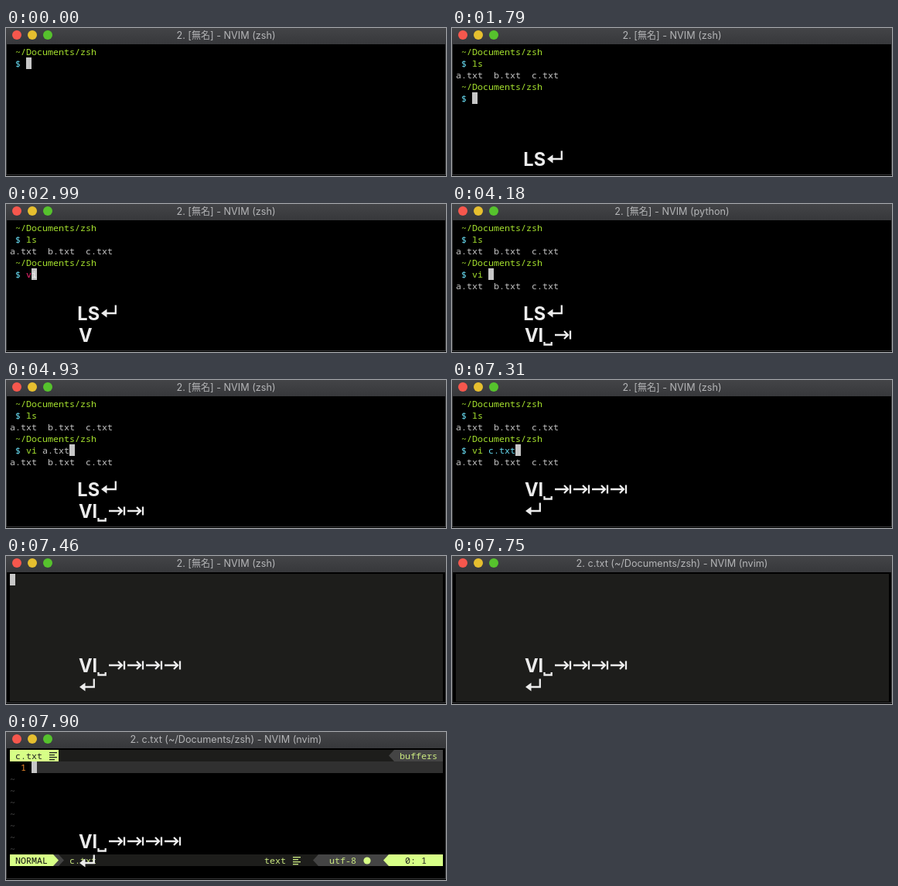
Animation, 569 px wide and 191 px high, one loop 8000 ms. Source, as an HTML page:

```html
<!DOCTYPE html>
<html lang="en">
<head>
<meta charset="utf-8">
<title>Terminal completion</title>
<style>
html, body { margin: 0; width: 100%; height: 100%; overflow: hidden; background: #000; }
svg { display: block; width: 569px; height: 191px; }
.mono { font: 11.667px "Noto Sans Mono", "DejaVu Sans Mono", monospace; white-space: pre; }
.title { font: 12.65px Inter, "Noto Sans CJK JP", sans-serif; fill: #b4b5b7; text-anchor: middle; }
.title .cjk { font: 12px "Noto Sans CJK JP", "Noto Sans CJK", sans-serif; }
.keys { font: 700 23.6px Inter, sans-serif; fill: #ececec; }
.keys .line { fill: none; stroke: #ececec; stroke-width: 2.3; }
</style>
</head>
<body>
<svg id="stage" viewBox="0 0 569 191" xmlns="http://www.w3.org/2000/svg"></svg>
<script>
const LOOP = 8000, CELL = 7, ROW = 15;
const GREEN = '#a6e22e', CYAN = '#66d9ef', RED = '#f92672', PLAIN = '#c4c4c4';
const LIME = '#d7ff87', GREY = '#444', DARK = '#1d1d1b', SOFT = '#cbea80', CURSOR = '#c7c7c7';
const TABS = [4180, 4930, 5670, 6270];

const colX = col => 5 + col * CELL;
const rowY = row => 23 + row * ROW;

// Content visible only between two times
const during = (from, to, ...parts) =>
  `<g data-from="${from}" data-to="${to}">${parts.join('')}</g>`;
const rect = (x, y, w, h, fill) =>
  `<rect x="${x}" y="${y}" width="${w}" height="${h}" fill="${fill}"/>`;
const text = (col, row, str, fill, extra = '') =>
  `<text class="mono" x="${colX(col)}" y="${rowY(row) + 12}" fill="${fill}" ${extra}>${str}</text>`;
const cells = (col, row, count, fill) => rect(colX(col), rowY(row), count * CELL, ROW, fill);
const cursor = (col, row) => cells(col, row, 1, CURSOR);
const wedge = (col, row, fill, left) => {
  const x = colX(col), y = rowY(row);
  const [base, tip] = left ? [x + CELL, x] : [x, x + CELL];
  return `<path d="M${base} ${y}L${tip} ${y + ROW / 2}L${base} ${y + ROW}Z" fill="${fill}"/>`;
};
const linesIcon = (x, row, fill) =>
  [10, 7, 10, 7].map((w, i) => rect(x, rowY(row) + 3 + i * 3, w, 1.3, fill)).join('');
const prompt = row => text(1, row, '~/Documents/zsh', GREEN) + text(1, row + 1, '$', CYAN);
const fileList = row => text(0, row, 'a.txt  b.txt  c.txt', PLAIN);

const title = str => `<text class="title" x="284.5" y="14">${str}</text>`;
const unnamed = job => title(`2. [<tspan class="cjk">無名</tspan>] - NVIM (${job})`);

// Keystroke overlay pieces, placed by left edge and baseline
const label = (str, x, y) => `<text x="${x}" y="${y}">${str}</text>`;
const glyph = (line, x, y, solid = '') =>
  `<g transform="translate(${x} ${y})"><path class="line" d="${line}"/><path d="${solid}"/></g>`;
const enterKey = (x, y) => glyph('M18.8-19.5V-9H5', x, y, 'M0-9L7.5-14.5V-3.5Z');
const spaceKey = y => glyph('M1.5 0V3.5H10.7V0', 118, y);
const tabKey = (i, y) => glyph('M0-9H16.5M12-14L17-9L12-4M20-14.5V-3.5', 133 + i * 24, y);

function windowFrame() {
  const lights = ['#f6574d', '#e6bf2f', '#56c22d'];
  return `<defs><linearGradient id="bar" x2="0" y2="1">
      <stop stop-color="#434447"/><stop offset="1" stop-color="#37383b"/>
    </linearGradient></defs>` +
    rect(0, 0, 569, 191, '#000') +
    '<rect x=".5" y=".5" width="568" height="189" fill="none" stroke="#3b3c3e"/>' +
    rect(0, 0, 569, 21, 'url(#bar)') +
    lights.map((c, i) => `<circle cx="${14 + i * 20}" cy="9" r="6" fill="${c}"/>`).join('');
}

function titles() {
  return [[0, 4180, 'zsh'], [4180, 4930, 'python'], [4930, 5070, 'zsh'],
    [5070, 5670, 'python'], [5670, 7600, 'zsh'], [7600, 7750, 'nvim']]
    .map(([from, to, job]) => during(from, to, unnamed(job))).join('') +
    during(7750, LOOP, title('2. c.txt (~/Documents/zsh) - NVIM (nvim)'));
}

function shell() {
  const argument = (from, to, name, fill) =>
    during(from, to, text(6, 4, name, fill), cursor(11, 4));
  return during(0, 7460, prompt(0)) +
    during(0, 1050, cursor(3, 1)) +
    during(1050, 7460, text(3, 1, 'ls', GREEN)) +
    during(1050, 1650, cursor(5, 1)) +
    during(1650, 7460, fileList(2)) +
    during(1650, 1790, cursor(0, 3)) +
    during(1790, 7460, prompt(3)) +
    during(1790, 2990, cursor(3, 4)) +
    during(2990, 3290, text(3, 4, 'v', RED), cursor(4, 4), text(4, 4, 'i', '#f2f2f2')) +
    during(3290, 7460, text(3, 4, 'vi', GREEN)) +
    during(3290, 3590, cursor(5, 4)) +
    during(3590, 4930, cursor(6, 4)) +
    during(4180, 7460, fileList(5)) +
    argument(4930, 5670, 'a.txt', PLAIN) +
    argument(5670, 6270, 'b.txt', CYAN) +
    argument(6270, 7460, 'c.txt', CYAN);
}

function editor() {
  const tildes = Array.from({ length: 7 }, (_, i) => text(0, i + 2, '~', '#4a4a4a'));
  const bold = 'font-weight="700"';
  return during(7460, 7900, rect(5, 23, 560, 165, DARK)) +
    during(7460, 7600, cursor(0, 0)) +
    during(7900, LOOP,
      cells(0, 0, 80, DARK), cells(0, 0, 9, LIME),
      text(1, 0, 'c.txt', '#222'), linesIcon(56, 0, '#222'),
      wedge(70, 0, GREY, true), cells(71, 0, 9, GREY), text(72, 0, 'buffers', SOFT),
      cells(4, 1, 76, '#303030'), text(2, 1, '1', '#ef8a2c'), cursor(4, 1),
      ...tildes,
      cells(0, 9, 80, DARK), cells(8, 9, 1, GREY),
      cells(0, 9, 8, LIME), wedge(8, 9, LIME), wedge(9, 9, GREY),
      text(1, 9, 'NORMAL', '#111', bold), text(11, 9, 'c.txt', SOFT),
      text(47, 9, 'text', SOFT), linesIcon(371, 9, SOFT),
      wedge(56, 9, GREY, true), cells(57, 9, 13, GREY), text(59, 9, 'utf-8', SOFT),
      `<circle cx="467" cy="166" r="4.6" fill="${LIME}"/>`,
      wedge(69, 9, LIME, true), cells(70, 9, 10, LIME), text(73, 9, '0: 1', '#222'));
}

function keystrokes() {
  const top = 150, bottom = 178;
  const upper = (from, ...parts) => during(from, 7310, ...parts);
  return '<g class="keys">' +
    during(1050, 2990, label('LS', 92.3, bottom)) +
    during(1650, 2990, enterKey(123, bottom)) +
    upper(2990, label('LS', 92.3, top), enterKey(123, top)) +
    during(2990, 3290, label('V', 94, bottom)) +
    upper(3290, label('VI', 94, bottom)) +
    upper(3440, spaceKey(bottom)) +
    TABS.map((time, i) => upper(time, tabKey(i, bottom))).join('') +
    during(7310, LOOP, label('VI', 94, top), spaceKey(top),
      ...TABS.map((_, i) => tabKey(i, top)), enterKey(95, bottom)) +
    '</g>';
}

const stage = document.getElementById('stage');
stage.innerHTML = windowFrame() + titles() + shell() + editor() + keystrokes();
const timed = [...stage.querySelectorAll('[data-from]')].map(el =>
  ({ el, from: +el.dataset.from, to: +el.dataset.to }));

const start = performance.now();
function draw() {
  const t = (performance.now() - start) % LOOP;
  for (const { el, from, to } of timed) {
    el.style.display = t >= from && t < to ? '' : 'none';
  }
  requestAnimationFrame(draw);
}
draw();
</script>
</body>
</html>
```
